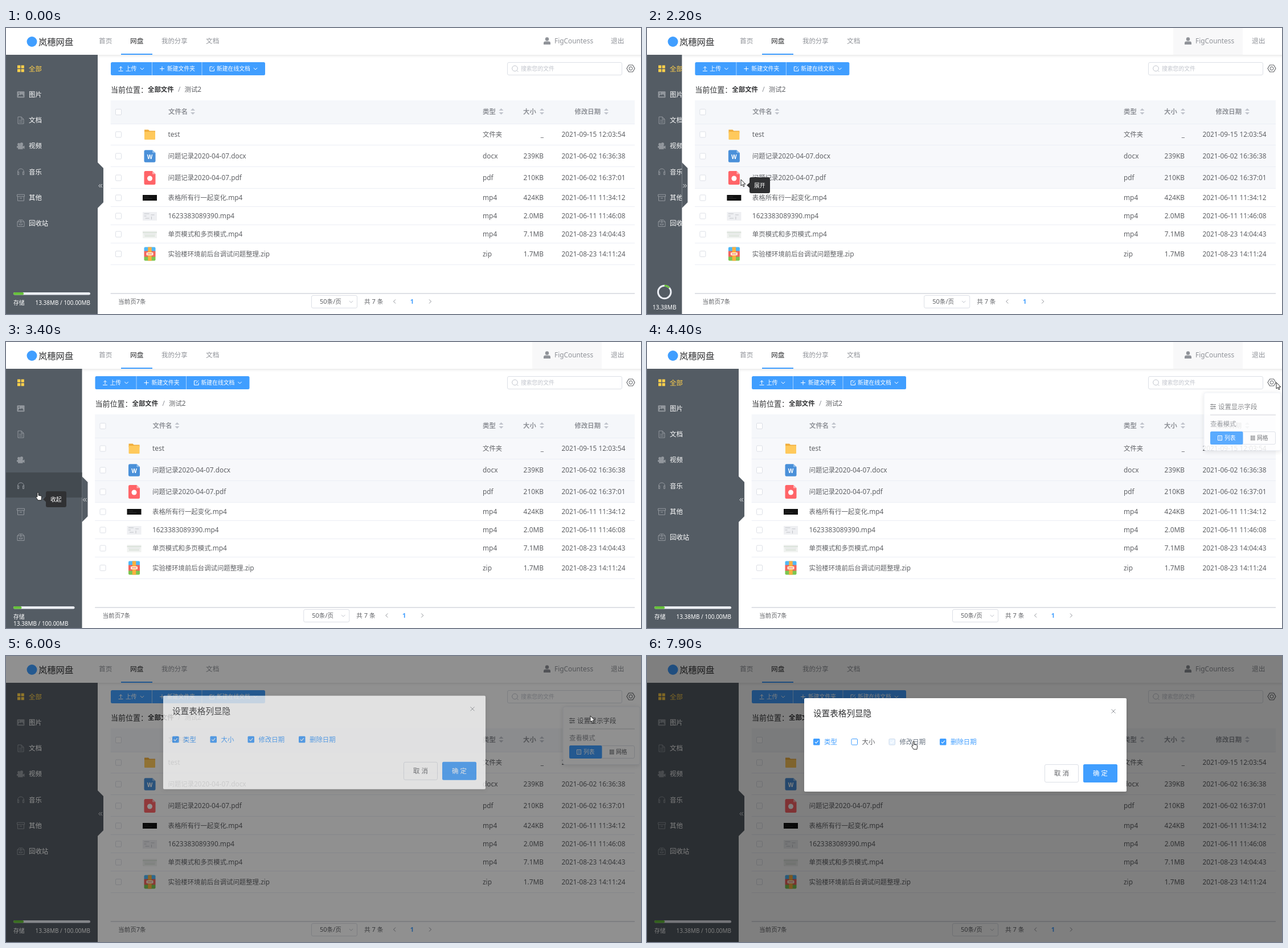
These frames come from a looping animation (1115x502 px, 8 s). An HTML page:

```html
<!DOCTYPE html>
<html lang="zh-CN">
<head>
<meta charset="utf-8">
<title>网盘</title>
<style>
html, body { margin: 0; width: 100%; height: 100%; overflow: hidden; background: #fff; }
svg { display: block; width: 1115px; height: 502px; }
text { font-family: "Noto Sans", "Noto Sans CJK SC", "Noto Sans CJK", sans-serif; white-space: pre; }
</style>
</head>
<body>
<svg id="stage" viewBox="0 0 1115 502"></svg>
<script>
const LOOP = 8000, STEP = 100;
const BLUE = '#409eff', INK = '#606266', DARK = '#303133', GREY = '#909399',
      PALE = '#c0c4cc', EDGE = '#dcdfe6', LINE = '#ebeef5', TINT = '#f5f7fa', SIDE = '#545c64';

// Markup helpers
const rect = (x, y, w, h, fill, more = '') =>
  `<rect x="${x}" y="${y}" width="${w}" height="${h}" fill="${fill}" ${more}/>`;
const box = (x, y, w, h, edge = EDGE, fill = '#fff', r = 2.5) =>
  rect(x + .5, y + .5, w - 1, h - 1, fill, `rx="${r}" stroke="${edge}"`);
const line = (d, color, w = 1, more = '') =>
  `<path d="${d}" fill="none" stroke="${color}" stroke-width="${w}" ${more}/>`;
const shape = (d, fill, more = '') => `<path d="${d}" fill="${fill}" ${more}/>`;
const dot = (x, y, r, fill, more = '') => `<circle cx="${x}" cy="${y}" r="${r}" fill="${fill}" ${more}/>`;
const group = (id, body, more = '') => `<g id="${id}" ${more}>${body}</g>`;
// Text centred vertically on y; Latin runs are a touch larger than the Chinese ones.
const text = (x, y, s, fill = INK, size = 11.4, more = '') => {
  const runs = s.replace(/[\x20-\xff]+/g, m => `<tspan font-size="${(size * 1.04).toFixed(2)}">${m}</tspan>`);
  return `<text x="${x}" y="${(y + size * .37).toFixed(2)}" font-size="${size}" fill="${fill}" ${more}>${runs}</text>`;
};
const bold = 'font-weight="700"', mid = 'text-anchor="middle"', end = 'text-anchor="end"';
const chevron = (x, y, color) => line(`M${x - 3.2} ${y - 1.6}l3.2 3.2 3.2-3.2`, color);
const sorter = x => shape(`M${x - 4} 145l4-4 4 4zM${x - 4} 148l4 4 4-4z`, PALE);

function header() {
  return rect(0, 0, 1115, 47, '#fff') +
    [.07, .05, .035, .02, .01].map((a, i) => rect(0, 47 + i, 1115, 1, '#000', `opacity="${a}"`)).join('') +
    rect(924, 0, 122, 47, '#f8f8f9', 'id="userHover"') +
    dot(45.5, 24, 9, BLUE) + text(57, 24, '岚穗网盘', DARK, 15.3) +
    text(163, 22.5, '首页', GREY, 11.7) + text(218, 22.5, '网盘', DARK, 11.7) +
    text(273, 22.5, '我的分享', GREY) + text(351, 22.5, '文档', GREY, 11.7) +
    rect(202, 45, 55, 2, BLUE) +
    dot(950, 19.5, 3.2, GREY) + shape('M944 29v-2.5q0-3 3-3h6q3 0 3 3V29z', GREY) +
    text(963, 22.5, 'FigCountess', GREY) + text(1062, 22.5, '退出', GREY, 11.7);
}

function sidebar() {
  const c = '#92979d', labels = ['全部', '图片', '文档', '视频', '音乐', '其他', '回收站'];
  const icons = [
    [0, 6.6].map(x => [0, 6.6].map(y => rect(x - 6, y - 6, 5.2, 5.2, '#ffd04b')).join('')).join(''),
    rect(-6.5, -5.5, 13, 11, c, 'rx="1"') + shape('M-5 3.5l3-4 2 2 2-2.5 3 4.5z', SIDE) + dot(-3, -2.5, 1.1, SIDE),
    line('M-5-6h6l4 4v8h-10zM1-6v4h4M-3 0h6M-3 3h6', c),
    rect(-5, -1.5, 8.5, 7, c) + dot(-3.5, -3, 2.4, c) + dot(1.3, -3.5, 2.7, c) + shape('M3 1l3.5-2v6l-3.5-2zM-7 0h3v3h-3z', c),
    line('M-5.5 1v-1a5.5 5.5 0 0 1 11 0v1M-5.5 0v5h2v-5zM5.5 0v5h-2v-5z', c),
    line('M-6.5-5.5h13v3.5h-13zM-5.5-2v7.5h11v-7.5M-2 1h4', c),
    line('M-6-3h12v8.5h-12zM-6-3l3-3h6l3 3M0-6v7M-2.5 0v2.5h5V0', c)
  ];
  const rowY = i => 71.5 + i * 45.25;
  return rect(0, 47, 161, 455, SIDE) +
    rect(0, 229, 161, 44, '#434a50', 'id="menuHover"') +
    icons.map((s, i) => `<g transform="translate(26 ${rowY(i)})">${s}</g>`).join('') +
    group('labels', labels.map((s, i) => text(40, rowY(i), s, i ? '#fff' : '#ffd04b')).join('')) +
    group('bar', rect(13, 464, 135, 4.6, LINE, 'rx="2.3" id="barBg"') + rect(13, 464, 18, 4.6, '#67c23a', 'rx="2.3" id="barOn"') +
      text(13, 482, '存储', '#fff', 9.8) + group('usage', text(0, 0, '13.38MB / 100.00MB', '#fff', 9.6))) +
    group('ring', dot(0, 463.5, 11.3, 'none', `stroke="${LINE}" stroke-width="3"`) +
      line('M0 452.2a11.3 11.3 0 0 1 8.42 3.76', '#67c23a', 3) + text(0, 490, '13.38MB', '#fff', 9.8, mid));
}

const handle = () => shape('M0 236L10 246V306L0 316z', SIDE, 'id="grip"') +
  group('arrows', line('M-.2-3l-3 3 3 3M3-3l-3 3 3 3', '#e4e6e8'));

// [name, type, size, date, centre y]
const files = [
  ['test', '文件夹', '_', '2021-09-15 12:03:54', 187],
  ['问题记录2020-04-07.docx', 'docx', '239KB', '2021-06-02 16:36:38', 225],
  ['问题记录2020-04-07.pdf', 'pdf', '210KB', '2021-06-02 16:37:01', 263],
  ['表格所有行一起变化.mp4', 'mp4', '424KB', '2021-06-11 11:34:12', 298],
  ['1623383089390.mp4', 'mp4', '2.0MB', '2021-06-11 11:46:08', 330],
  ['单页模式和多页模式.mp4', 'mp4', '7.1MB', '2021-08-23 14:04:43', 362],
  ['实验楼环境前后台调试问题整理.zip', 'zip', '1.7MB', '2021-08-23 14:11:24', 396.5]
];
const sheet = (fill, fold) => shape('M-7.5-12h12l5.5 5.5v16q0 2.5-2.5 2.5h-15q-2.5 0-2.5-2.5v-19q0-2.5 2.5-2.5z', fill) +
  shape('M4.5-12l5.5 5.5h-5.5z', fold);
const fileIcons = [
  shape('M-9.5-8.5h7l2 2h10v4h-19z', '#f0ad3c') + rect(-9.5, -5, 19, 14, '#ffc95c', 'rx="1"'),
  `<g transform="scale(1 .9)">${sheet('#4a90d9', '#8fbdeb')}</g>` + text(0, 1.5, 'W', '#fff', 9.5, `${mid} ${bold}`),
  sheet('#ff6468', '#ffb0b2') + dot(0, 1, 4.5, '#fff'),
  rect(-12.5, -5, 25, 10, '#111') + line('M-10-1.5h8M-10 1.5h14', '#333', .8),
  rect(-12.5, -7, 25, 15, '#eeeff2') + line('M-10-4h9M-10 0h4M2-2h6M3 1v5M-8 4h7', '#b5b8bd', .8),
  rect(-12.5, -6, 25, 13, '#f0f2f0') + line('M-12.5-3h25M-9 3h18', '#bcc9bc', .8) + line('M-10 0h20', '#d5d8d8', .8),
  rect(-10, -12, 20, 8.5, '#50b8f5', 'rx="2"') + rect(-10, 3.5, 20, 8.5, '#7cc651', 'rx="2"') + rect(-10, -5, 20, 10, '#f2655c') +
    rect(-3.2, -12, 6.4, 24, '#fbb040') + rect(-6, -2.5, 12, 5, '#fff0d8', 'rx="1"') + line('M-4 0h8', '#f2655c', 1.2)
];

function grid() {
  const edges = [168, 205.5, 243.5, 281.5, 313.5, 345.5, 377.5, 415];
  return rect(70, 127, 1034, 41, TINT) +
    [0, 1, 2].map(i => rect(70, edges[i], 1034, edges[i + 1] - edges[i], '#f7f8fb', `id="row${i}"`)).join('') +
    edges.map(y => line(`M70 ${Math.floor(y) + .5}H1104`, LINE)).join('') + line('M70 466H1104', '#d3d6dc', 1.4);
}

function fixedPart() {
  return box(880, 60, 202, 23) + dot(893.5, 71, 4.8, 'none', `stroke="${PALE}"`) + line('M897 74.5l2.5 2.5', PALE) +
    text(904, 71.5, '搜索您的文件', PALE, 9.8) +
    line('M1093.5 65h7l3.5 6-3.5 6h-7l-3.5-6z', INK, 1.1, 'stroke-linejoin="round"') + dot(1097, 71, 3, 'none', `stroke="${INK}"`) +
    [[837, '类型', 869.5], [908, '大小', 941], [998.5, '修改日期', 1054]].map(([x, s, a]) => text(x, 146.5, s, GREY, 11.4, bold) + sorter(a)).join('') +
    files.map(([, type, size, date, y]) => text(837, y, type) + text(944, y, size, INK, 11.4, end) + text(975.5, y, date)).join('');
}

function slidingPart() {
  const check = y => box(192, y - 5.5, 11, 11, EDGE, '#fff', 1.5);
  return rect(184, 60, 271, 23, BLUE, 'rx="2.5"') + line('M256.5 60v23M344 60v23', '#a6d2ff') +
    line('M201.5 74v-6M198.8 70.4l2.7-2.7 2.7 2.7M197.5 75.5h8', '#fff') + text(210, 71.5, '上传', '#fff', 9.8) + chevron(239, 71.5, '#fff') +
    line('M270 71.5h8M274 67.5v8', '#fff') + text(283, 71.5, '新建文件夹', '#fff', 9.8) +
    line('M362.5 68h-4.5v7.5h7.5v-4M361 72.5l4.5-5', '#fff') + text(370, 71.5, '新建在线文档', '#fff', 9.8) + chevron(438, 71.5, '#fff') +
    text(184, 108, '当前位置：', DARK, 13) + text(249, 108, '全部文件', DARK, 11.4, bold) +
    text(302, 108, '/', GREY) + text(313.5, 108, '测试2') +
    check(147.5) + text(285, 146.5, '文件名', GREY, 11.4, bold) + sorter(328) +
    files.map(([name, , , , y], i) => check(y) + `<g transform="translate(252.5 ${y})">${fileIcons[i]}</g>` + text(284.5, y, name)).join('') +
    text(197, 480.5, '当前页7条', INK, 10.6);
}

const pager = () => box(536, 469, 81, 23) + text(551, 480.5, '50条/页', INK, 10.6) + chevron(606, 480.5, PALE) +
  text(629, 480.5, '共 7 条', INK, 10.6) + line('M684 476.5l-3.5 3.5 3.5 3.5M743 476.5l3.5 3.5-3.5 3.5', GREY) +
  text(713, 480.5, '1', BLUE, 10.6, `${mid} ${bold}`);

function popover() {
  return shape('M1092 89.5l5-5 5 5z', '#fff') + rect(978, 89, 135, 101.5, '#fff', `rx="3" stroke="${LINE}" filter="url(#soft)"`) +
    line('M989 110h10M989 113.5h10M989 117h10M992 108.5v3M996 112v3M992 115.5v3', INK) +
    group('fields', text(1003, 114, '设置显示字段')) + line('M989 128H1104', '#c9ccd2', 1.2) +
    text(989, 144, '查看模式', GREY) + box(989, 157, 115, 23) + rect(989, 157, 57.5, 23, BLUE, 'rx="2.5"') +
    line('M1002.5 164.5h7v8h-7zM1004.5 167h3M1004.5 170h3', '#fff') + text(1014, 168.5, '列表', '#fff', 9.8) +
    [0, 1, 2].map(i => line(`M1060 ${165.5 + i * 3}h7.5`, INK, 2, 'stroke-dasharray="2 .75"')).join('') + text(1071, 168.5, '网格', INK, 9.8);
}

const options = [[292, '类型'], [358.5, '大小'], [424.5, '修改日期'], [514, '删除日期']];
function dialog() {
  return rect(276, 74, 566, 164, '#fff', 'rx="2" filter="url(#soft)"') + text(292, 100.5, '设置表格列显隐', DARK, 14.6) +
    line('M815.5 93.5l7 7M822.5 93.5l-7 7', GREY) +
    options.map(([x, s], i) =>
      group('off' + i, box(x, 145, 11.5, 11.5, i == 1 ? BLUE : EDGE, '#fff', 1.5) + text(x + 19, 150.5, s)) +
      group('on' + i, rect(x, 145, 11.5, 11.5, BLUE, 'rx="1.5"') +
        line(`M${x + 2.8} 150.8l2.2 2.2 3.8-4.4`, '#fff', 1.1) + text(x + 19, 150.5, s, BLUE))).join('') +
    box(698, 190, 60, 32) + text(728, 206, '取 消', INK, 11.4, mid) +
    rect(766, 190, 60, 32, BLUE, 'rx="2.5"') + text(796, 206, '确 定', '#fff', 11.4, mid);
}

const tooltip = () => shape('M-5 276l5-4.5v9z', DARK) + rect(0, 262, 36, 28, DARK, 'rx="3"') +
  group('fold', text(8, 276, '收起', '#fff', 9.8)) + group('unfold', text(8, 276, '展开', '#fff', 9.8));

const pointer = () =>
  shape('M0 0V11L2.6 8.7 4.3 12.6 6 11.8 4.3 8H7.8Z', '#fff', 'id="arrow" stroke="#111" stroke-width=".9"') +
  shape('M-1.1 8V1A1.1 1.1 0 0 1 1.1 1V5.2L5.8 6.2Q6.9 6.5 6.7 8L6 13.8H.2L-2.8 9.4Q-3.8 7.6-2.6 7.2Z', '#fff', 'id="hand" stroke="#111" stroke-width=".9"');

document.getElementById('stage').innerHTML =
  `<defs><clipPath id="sideClip"><rect id="sideBox" y="47" width="161" height="455"/></clipPath>
   <clipPath id="gridClip"><rect id="gridBox" y="120" width="920" height="360"/></clipPath>
   <filter id="soft" x="-20%" y="-20%" width="140%" height="140%"><feDropShadow dx="0" dy="1.6" stdDeviation="4" flood-opacity=".12"/></filter></defs>` +
  rect(0, 0, 1115, 502, '#fff') + group('grid', grid(), 'clip-path="url(#gridClip)"') +
  fixedPart() + group('sliding', slidingPart()) + group('pager', pager()) +
  header() + group('side', sidebar(), 'clip-path="url(#sideClip)"') + group('handle', handle()) +
  group('tip', tooltip()) + group('popover', popover()) +
  rect(0, 0, 1115, 502, '#000', 'id="shade"') + group('dialog', dialog()) + group('pointer', pointer());

// Animation
const $ = id => document.getElementById(id);
const attr = (id, name, v) => $(id).setAttribute(name, v);
const fade = (id, v) => attr(id, 'opacity', +v);
const move = (id, x, y = 0, more = '') => attr(id, 'transform', `translate(${x} ${y})${more}`);
const ramp = (t, a, d) => Math.min(1, Math.max(0, (t - a) / d));
const within = (t, a, b) => t >= a && t < b;

// CSS "ease": cubic-bezier(.25, .1, .25, 1)
function ease(p) {
  let lo = 0, hi = 1;
  for (let i = 0; i < 20; i++) {
    const u = (lo + hi) / 2;
    if (.75 * u * (1 - u) + u ** 3 < p) lo = u; else hi = u;
  }
  return .3 * lo * (1 - lo) ** 2 + 3 * lo * lo * (1 - lo) + lo ** 3;
}

// Pointer path: [ms, x, y]
const path = [
  [600, 1038, 20], [700, 940, 22], [800, 787, 19], [900, 460, 73], [1000, 330, 150], [1200, 255, 185], [1400, 187, 262],
  [1500, 165, 266], [2300, 165, 266], [2800, 56, 264], [3500, 56, 264], [4100, 1085, 82], [4200, 1105, 71],
  [5000, 1105, 71], [5100, 1096, 74], [5300, 1023, 120], [5500, 1023, 120], [5700, 1026, 105], [6100, 1026, 105],
  [6700, 433, 160], [6900, 434, 149], [7100, 434, 149], [7300, 384, 150], [7500, 384, 150], [7700, 468, 150]
];
function pointAt(t) {
  const i = path.findIndex(p => p[0] > t);
  if (i < 1) return path[i < 0 ? path.length - 1 : 0].slice(1);
  const [a, b] = [path[i - 1], path[i]], k = (t - a[0]) / (b[0] - a[0]);
  return [a[1] + (b[1] - a[1]) * k, a[2] + (b[2] - a[2]) * k];
}

function render(t) {
  const w = 161 - 109 * (ease(ramp(t, 2006, 300)) - ease(ramp(t, 3265, 300)));
  const dx = w - 161, closed = within(t, 2000, 3265);
  attr('sideBox', 'width', w);
  attr('gridBox', 'x', w + 22.7);
  attr('gridBox', 'width', 1104 - w - 22.7);
  move('sliding', dx);
  move('pager', dx / 2);
  move('handle', w);
  move('arrows', 5, 277, closed ? ' scale(-1 1)' : '');
  attr('grip', 'fill', within(t, 1500, 2000) || within(t, 2800, 3300) ? '#484f56' : SIDE);

  fade('labels', !within(t, 2300, 3560));
  fade('menuHover', within(t, 3300, 3600));
  fade('ring', closed);
  fade('bar', !closed);
  move('ring', w / 2);
  attr('barBg', 'width', w - 26);
  attr('barOn', 'width', (w - 26) * .134);
  w < 158 ? move('usage', 13, 494.5) : move('usage', 51.5, 482);

  fade('userHover', within(t, 700, 5900));
  [1100, 1200, 1300].forEach((at, i) => fade('row' + i, within(t, at, 5900)));

  const second = t >= 2600;
  move('tip', second ? 70 : 180);
  fade('tip', second ? ramp(t, 2850, 150) - ramp(t, 3400, 200) : ramp(t, 1450, 300) - ramp(t, 2200, 200));
  fade('fold', !closed);
  fade('unfold', closed);

  fade('popover', ramp(t, 4230, 200) - ramp(t, 6050, 200));
  fade('fields', t < 5700 ? .88 : 1);
  const open = ease(ramp(t, 5885, 260));
  fade('shade', ease(ramp(t, 5885, 200)) * .5);
  fade('dialog', open);
  move('dialog', 0, -16 * (1 - open));
  options.forEach((_, i) => {
    const off = i == 1 ? ramp(t, 7300, 200) : i == 2 ? ramp(t, 7720, 200) : 0;
    fade('on' + i, 1 - off);
    fade('off' + i, off);
  });

  const hand = within(t, 1500, 2100) || within(t, 2800, 3600) || t >= 6700;
  move('pointer', ...pointAt(t));
  fade('pointer', t >= 600);
  fade('hand', hand);
  fade('arrow', !hand);
}

const start = performance.now();
function tick() {
  const t = (performance.now() - start) % LOOP;
  render(Math.floor(t / STEP) * STEP);
  requestAnimationFrame(tick);
}
tick();
</script>
</body>
</html>
```
